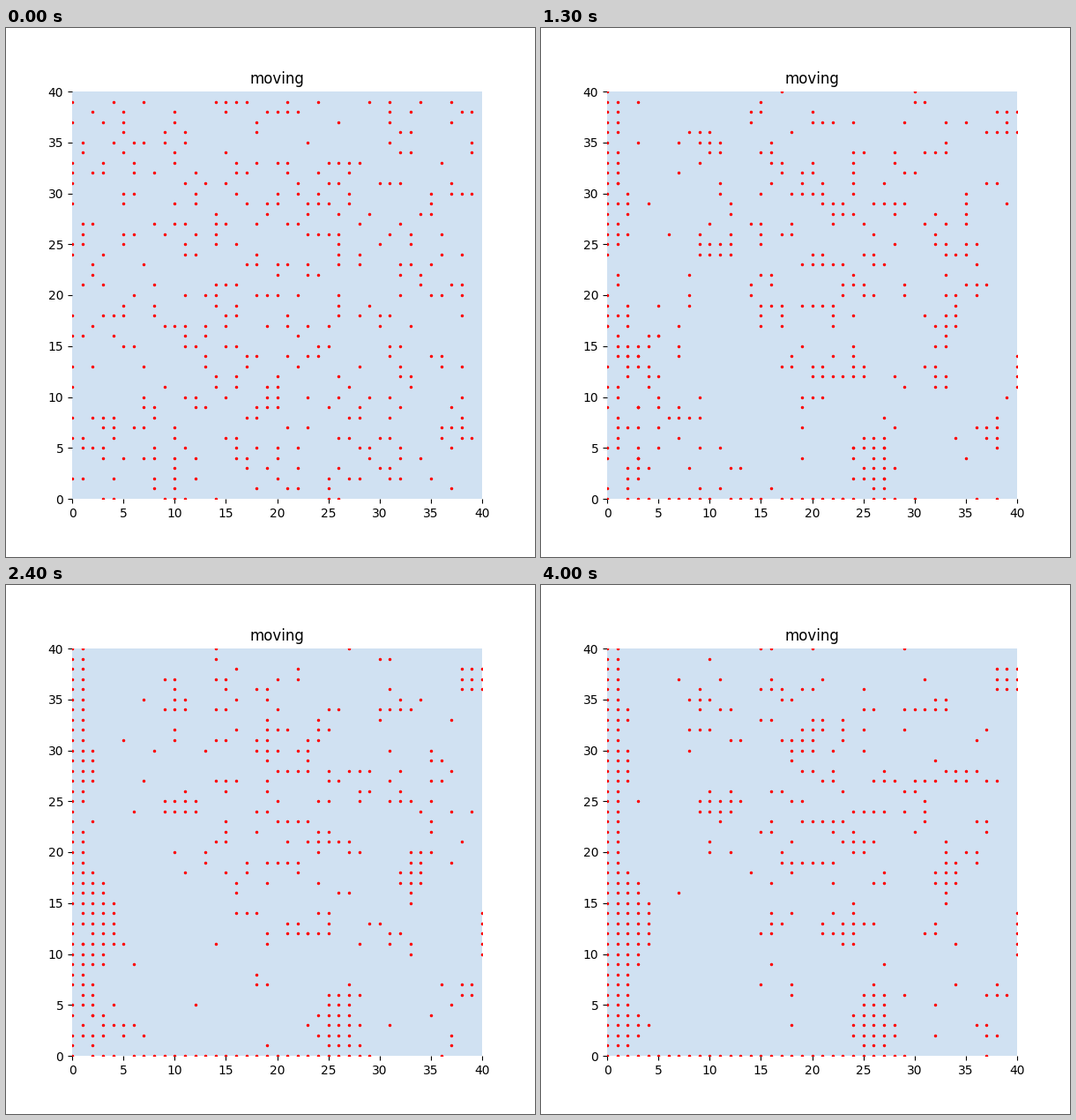
Write a matplotlib script that moves like this. It is 600 px wide and 600 px high and loops after 4100 ms.

```python
import numpy as np
import matplotlib.pyplot as plt
from matplotlib.animation import FuncAnimation

SIZE = 40
AGENTS = 400
FRAMES = 41
STEPS = np.array([(-1, 0), (1, 0), (0, -1), (0, 1)])
DRIFT = [0.34, 0.2, 0.26, 0.2]

# Gathering spots away from the left edge: centre and radii
SPOTS = [
    (25.8, 3, 2.2, 3.4), (33, 17.5, 1.2, 2.6), (39, 37, 1.5, 1.5),
    (24, 21, 1.2, 1.2), (10.5, 24.5, 2.2, 0.8), (21.5, 23, 2, 0.5),
    (20.5, 19, 2, 0.5), (31.5, 34, 2, 0.5), (22.5, 12, 2, 0.5),
    (19, 30, 1.2, 0.5), (40, 12, 0.5, 2.2),
]

rng = np.random.default_rng(12)


def bump(y, centre, width, height):
    return height * np.exp(-((y - centre) / width) ** 2)


def home_cells():
    """Cells of the left band, the bottom row and the spots."""
    x, y = np.meshgrid(np.arange(SIZE + 1), np.arange(SIZE + 1))
    band = (2 + bump(y, 13, 5, 3.9) + bump(y, 3, 2.5, 3)
            + bump(y, 28.5, 2.5, 1.7))
    inside = (x + 1 <= band) | ((y == 0) & (x < 30))
    for cx, cy, rx, ry in SPOTS:
        inside |= ((x - cx) / rx) ** 2 + ((y - cy) / ry) ** 2 < 1
    return rng.permutation(np.column_stack((x[inside], y[inside])))


def assign_homes(pos, cells):
    """Give every home cell to the nearest agent that has none yet."""
    homes = {}
    for cell in cells:
        dist = np.abs(pos - cell).sum(axis=1).astype(float)
        dist[list(homes)] = np.inf
        homes[int(dist.argmin())] = cell
    return homes


def toward(here, goal):
    gap = goal - here
    axis = rng.choice(2, p=np.abs(gap) / np.abs(gap).sum())
    step = np.zeros(2, int)
    step[axis] = np.sign(gap[axis])
    return step


def simulate():
    start = rng.choice(SIZE * SIZE, AGENTS, replace=False)
    pos = np.column_stack((start % SIZE, start // SIZE))
    homes = assign_homes(pos, home_cells())
    history = [pos.copy()]
    for t in range(1, FRAMES):
        pull = 0.45 + 0.4 * t / FRAMES
        taken = {tuple(p) for p in pos}
        for k in rng.permutation(AGENTS):
            here, goal = pos[k].copy(), homes.get(int(k))
            step = rng.choice(STEPS, p=DRIFT)
            if goal is not None:
                if (here == goal).all():
                    continue
                if rng.random() < pull:
                    step = toward(here, goal)
            else:
                company = any(tuple(here + s) in taken for s in STEPS)
                if company and rng.random() < 0.75:
                    continue
            new = np.clip(here + step, 0, SIZE)
            if goal is not None or tuple(new) not in taken:
                pos[k] = new
                taken.discard(tuple(here))
                taken.add(tuple(new))
        history.append(pos.copy())
    return history


history = simulate()

fig, ax = plt.subplots(figsize=(6, 6), dpi=100)
ax.set_facecolor("#d0e1f2")
ax.set(xlim=(0, SIZE), ylim=(0, SIZE))
ax.set_title("moving", pad=6.7)
ax.set_xticks(range(0, SIZE + 1, 5))
ax.set_yticks(range(0, SIZE + 1, 5))
for spine in ax.spines.values():
    spine.set_visible(False)
dots, = ax.plot([], [], "r.", markersize=3)


def draw(i):
    dots.set_data(history[i][:, 0], history[i][:, 1])
    return dots,


anim = FuncAnimation(fig, draw, frames=FRAMES, interval=100, repeat=True)
plt.show()
```
